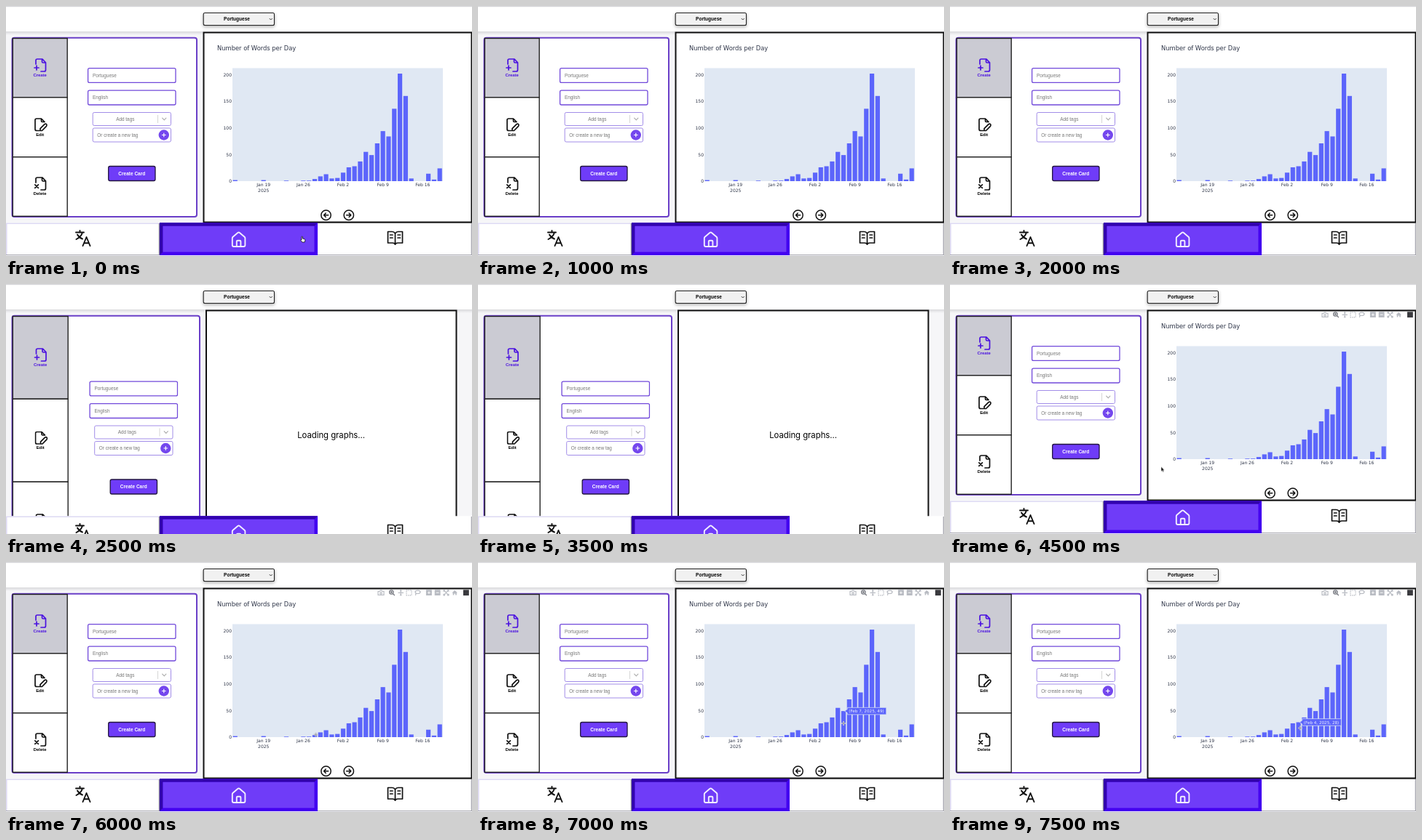
Animation, 640 px wide and 344 px high, one loop 8 s. Source, as an HTML page:

```html
<!DOCTYPE html>
<html lang="en">
<head>
<meta charset="utf-8">
<title>Flashcard dashboard</title>
<style>
html, body { margin: 0; width: 100%; height: 100%; overflow: hidden; background: #f6f6f8; }
svg { display: block; width: 640px; height: 344px; font-family: "Liberation Sans", Arial, sans-serif; }
.line { fill: none; stroke: #111; stroke-width: 1.7; stroke-linecap: round; stroke-linejoin: round; }
.box { fill: #fff; stroke: #111; stroke-width: 2; }
.card { fill: #fff; stroke: #6a3fc8; stroke-width: 2; }
.cell { fill: #fff; stroke: #222; stroke-width: 1.4; }
.on { fill: #cbcbd3; }
.field { fill: #fff; stroke: #7149da; stroke-width: 1.3; }
.soft { stroke: #a28de8; stroke-width: 1; }
.hint { font-size: 6.4px; fill: #777; }
.bold { font-weight: bold; font-size: 6.5px; }
.side { font-weight: bold; font-size: 5.9px; text-anchor: middle; }
.mid { text-anchor: middle; }
.plot { font-family: "DejaVu Sans", Verdana, sans-serif; font-size: 6px; fill: #2d3447; }
.tools { fill: none; stroke: #b9bcc3; stroke-width: 1.2; }

/* every part follows one 8 s clock and changes on half seconds */
.move, .home, .load, .tools, .hand, .arrow, .cross, .tip4, .tip7 {
  animation: 8s step-end infinite;
}
.move { animation-name: move; }
.home { animation-name: home; }
.load { animation-name: load; }
.tools { animation-name: tools; }
.hand { animation-name: hand; }
.arrow { animation-name: arrow; }
.cross { animation-name: cross; }
.tip4 { animation-name: tip4; }
.tip7 { animation-name: tip7; }
@keyframes move {
  0%, 56.25%, 100% { transform: none; }
  31.25% { transform: translate(var(--x), var(--y)); }
}
@keyframes home { 0%, 56.25%, 100% { visibility: visible; } 31.25% { visibility: hidden; } }
@keyframes load { 0%, 56.25%, 100% { visibility: hidden; } 31.25% { visibility: visible; } }
@keyframes tools { 0% { visibility: hidden; } 56.25%, 100% { visibility: visible; } }
@keyframes hand { 0% { visibility: visible; } 12.5%, 100% { visibility: hidden; } }
@keyframes arrow {
  0%, 62.5%, 100% { visibility: hidden; }
  50% { visibility: visible; transform: translate(270.5px, 248.5px); }
  56.25% { visibility: visible; transform: translate(290px, 251.5px); }
}
@keyframes cross {
  0% { visibility: hidden; }
  62.5% { visibility: visible; transform: translate(360px, 239px); }
  68.75% { visibility: visible; transform: translate(400px, 238px); }
  75% { visibility: visible; transform: translate(425.5px, 237.5px); }
  81.25% { visibility: visible; transform: translate(478px, 230px); }
  87.5% { visibility: visible; transform: translate(502px, 222px); }
  93.75%, 100% { visibility: visible; transform: translate(481px, 228.5px); }
}
@keyframes tip4 {
  0%, 87.5% { visibility: hidden; }
  81.25%, 93.75%, 100% { visibility: visible; }
}
@keyframes tip7 { 0%, 93.75%, 100% { visibility: hidden; } 87.5% { visibility: visible; } }
</style>
</head>
<body>
<svg viewBox="0 0 640 344">
  <defs>
    <linearGradient id="shade" x2="0" y2="1">
      <stop stop-color="#d9d9dc"/><stop offset="1" stop-color="#f6f6f8"/>
    </linearGradient>
    <filter id="drop" x="-20%" y="-30%" width="140%" height="200%">
      <feDropShadow dx="0" dy="2" stdDeviation="2" flood-opacity=".3"/>
    </filter>
    <path id="page" d="M41 80V75q0-2 2-2h7l4.5 4.800V88q0 2-2 2H48M49.500 73v3.500q0 1.500 1.500 1.500h3.500"/>
  </defs>

  <rect width="640" height="344" fill="#f6f6f8"/>
  <rect y="35" width="640" height="5" fill="url(#shade)"/>
  <rect width="640" height="35" fill="#fff"/>
  <rect width="640" height="1.200" fill="#d5d5d8"/>
  <rect x="271.200" y="9.500" width="97.300" height="17" rx="2" fill="#f1f1f1" stroke="#222" stroke-width="1.100" filter="url(#drop)"/>
  <text class="bold mid" x="317" y="20.300">Portuguese</text>
  <path class="line" style="stroke-width:.8" d="M362 17.300l1.700 1.700 1.700-1.700"/>

  <g class="home">
    <rect class="card" x="8.500" y="43.800" width="253.500" height="246.200" rx="3"/>
    <rect class="cell on" x="9.300" y="44.500" width="74.900" height="81.300"/>
    <rect class="cell" x="9.300" y="125.800" width="74.900" height="82"/>
    <rect class="cell" x="9.300" y="207.800" width="74.900" height="81.500"/>
    <rect class="box" x="271.500" y="36.500" width="368" height="261"/>
  </g>
  <g class="load">
    <rect class="card" x="8.500" y="43.800" width="257.500" height="340" rx="3"/>
    <rect class="cell on" x="9.300" y="44.500" width="75.900" height="113.700"/>
    <rect class="cell" x="9.300" y="158.200" width="75.900" height="114.100"/>
    <rect class="cell" x="9.300" y="272.300" width="75.900" height="114"/>
    <rect class="box" x="275" y="36.500" width="343.500" height="350"/>
    <text class="mid" x="446.600" y="211.500" style="font:11.3px Inter, sans-serif">Loading graphs...</text>
  </g>

  <g class="move" style="--x:.5px;--y:16px">
    <g class="line" style="stroke:#4b12e0"><use href="#page"/><path d="M39 85h6M42 82v6"/></g>
    <text class="side" x="46.700" y="97.300" fill="#4b12e0">Create</text>
  </g>
  <g class="move" style="--x:.5px;--y:48.500px">
    <path class="line" d="M45.500 171.500H42q-2 0-2-2V157q0-2 2-2h6.500l4.500 4.500M48.500 155v3q0 1.500 1.500 1.500h3M47 171.500v-2.800l6-6q1.400-1 2.500 0t0 2.600l-6 6.200z"/>
    <text class="side" x="46.700" y="178.700">Edit</text>
  </g>
  <g class="move" style="--x:.5px;--y:81px">
    <g class="line"><use href="#page" y="163"/><path d="M39.800 245.800l4.600 4.600m0-4.600l-4.600 4.600"/></g>
    <text class="side" x="46.700" y="260.300">Delete</text>
  </g>

  <g class="move" style="--x:2.500px;--y:48.500px">
    <rect class="field" x="112.600" y="85.600" width="120.400" height="19.800" rx="2"/>
    <text class="hint" x="119" y="97.800">Portuguese</text>
    <rect class="field" x="112.600" y="116.200" width="120.400" height="19.800" rx="2"/>
    <text class="hint" x="119" y="128.400">English</text>
    <rect class="field soft" x="119.200" y="146.500" width="107.300" height="18" rx="2"/>
    <text class="hint mid" x="163.800" y="157.800">Add tags</text>
    <path d="M208.500 150v11" stroke="#ccc" stroke-width=".8"/>
    <path class="line" style="stroke:#aaa;stroke-width:1.100" d="M214.700 154.200l2.600 2.600 2.600-2.600"/>
    <rect class="field soft" x="119.200" y="168" width="107.300" height="19" rx="2"/>
    <text class="hint" x="125.300" y="179.700">Or create a new tag</text>
    <circle cx="216.800" cy="177.500" r="7.200" fill="#7447ee"/>
    <path d="M214 177.500h5.600m-2.800-2.800v5.600" stroke="#fff" stroke-width="1.200"/>
    <rect x="140.700" y="220.500" width="64.300" height="20" rx="2.200" fill="#6f3cf8" stroke="#22153f" stroke-width="1.300"/>
    <text class="bold mid" x="172.800" y="232.700" fill="#fff">Create Card</text>
  </g>

  <g class="home">
    <g class="plot">
      <text x="290" y="61" style="font-size:8.350px">Number of Words per Day</text>
      <rect x="311" y="85.500" width="289" height="155.500" fill="#e0e8f3"/>
      <g id="bars" fill="#5c65fb"></g>
      <g id="ticks"></g>
    </g>
    <g class="line" style="stroke-width:1.500">
      <circle cx="439.500" cy="287.800" r="6.700"/>
      <path d="M442.700 287.800h-6.200m2.700-2.700l-2.700 2.700 2.700 2.700"/>
      <circle cx="470.800" cy="287.800" r="6.700"/>
      <path d="M467.600 287.800h6.200m-2.700-2.700l2.700 2.700-2.700 2.700"/>
    </g>
  </g>

  <g class="tools">
    <path d="M511 40.500h2l1-1.300h2l1 1.300h2v4.800h-8z"/><circle cx="515" cy="42.800" r="1.300"/>
    <g stroke="#74777f"><circle cx="529.300" cy="41.500" r="2.700"/><path d="M531.300 43.500l2.500 2.500M527.800 41.500h3m-1.500-1.500v3"/></g>
    <path d="M538.500 42.300h7.400M542.200 38.600V46M541 39.800l1.200-1.200 1.200 1.200M541 44.800l1.200 1.200 1.200-1.200"/>
    <path d="M550 38.800h7v7h-7z" stroke-dasharray="1.500 1"/>
    <ellipse cx="565.500" cy="41.300" rx="3.500" ry="2.200"/><path d="M563 43l-.5 3"/>
    <path d="M577.500 38.800h6.700v6.700h-6.700zM589.300 38.800h6.700v6.700h-6.700z" fill="#b9bcc3"/>
    <path d="M579 42.200h3.800m-1.900-1.900v3.800M590.800 42.200h3.800" stroke="#fff" stroke-width=".9"/>
    <path d="M601.500 39l6 6.500m0-6.500l-6 6.500M601 40.800v-2h2M606 38.800h2v2M601 43.800v2h2M606 45.800h2v-2"/>
    <path d="M612.500 42.500l3.800-3.700 3.800 3.700h-1.200v3h-1.700v-2h-1.800v2h-1.700v-3z" fill="#b9bcc3" stroke="none"/>
    <rect x="628" y="38.300" width="7.800" height="7.800" fill="#3a3a3e" stroke="none"/>
  </g>

  <g class="move" style="--x:0px;--y:21px">
    <rect y="298.300" width="640" height="44.700" fill="#fff"/>
    <path d="M0 299.300h211M.8 299v43" fill="none" stroke="#ddd9f3" stroke-width="1.500"/>
    <path d="M0 342.500h211M428 342.500h212M639.300 299v44" stroke="#a5a5ad" stroke-width="1.200"/>
    <path d="M271 298.200h369" class="home" stroke="#222" stroke-width="1"/>
    <path d="M210.500 299v44" stroke="#8e8b9d" stroke-width="1.500"/>
    <rect x="211" y="298.300" width="217" height="44.700" fill="#4300f0"/>
    <path d="M211 343v-44.700h217l-4.500 4.500h-208v35.700z" fill="#3203ad"/>
    <rect x="215.500" y="302.800" width="208" height="35.700" fill="#6f3cf8"/>
    <g class="line" style="stroke-width:1.900">
      <path d="M96 311.500h11M101.500 309v2.500M105 311.500q-1.500 6-8.500 9.500M98 314.500q2.500 4.500 7 6M105.500 330l5-12 5 12M107.300 326.300h6.500"/>
      <path d="M534.500 313v15M534.500 313q-1.500-2.500-4-2.500h-6v15.500h6.500q2.500 0 3.500 2 1-2 3.500-2h6.500v-15.500h-6q-2.500 0-4 2.500M527.500 315h3.500M527.500 319h3.500M538 315h3.500M538 319h3.500" stroke-width="1.700"/>
      <path d="M310.800 319.500q0-1 .8-1.700l6.700-5.800q1.300-1 2.600 0l6.700 5.800q.8.700.8 1.700v9.500q0 2-2 2h-13.600q-2 0-2-2zM316.800 331v-7q0-1.200 1.200-1.200h3.200q1.200 0 1.200 1.200v7" stroke="#f1edff"/>
    </g>
  </g>

  <g id="tips" class="plot"></g>
  <path class="hand" d="M406 317.300q1-.8 1.400.4v2.300l2.600.7q1 .4.800 1.500l-.6 2.800h-3.400l-2.300-3q.2-1.200 1.500-.2z" fill="#fff" stroke="#111" stroke-width=".8"/>
  <path class="arrow" d="M0 0v6.400l1.500-1.300 1 2.200 1.100-.5-1-2.100h2z" fill="#111" stroke="#fff" stroke-width=".4"/>
  <g class="cross">
    <path d="M-3 0h6M0-3v6" stroke="#eee" stroke-width="1.600"/>
    <path d="M-2.700 0h5.400M0-2.700v5.400" stroke="#6d7180" stroke-width=".7"/>
  </g>
</svg>
<script>
const counts = [2, 0, 0, 0, 0, 2, 0, 0, 0, 1, 0, 0, 1, 1, 4, 9, 13, 5, 6, 16, 26, 28,
  37, 55, 49, 71, 94, 84, 136, 202, 160, 5, 0, 0, 14, 3, 24];
const dayX = day => 314.7 + day * 7.805;
const countY = count => 241 - count * 0.7325;
const fill = (id, html) => { document.getElementById(id).innerHTML = html; };
const label = (x, y, anchor, text) => `<text x="${x}" y="${y}" text-anchor="${anchor}">${text}</text>`;

fill("bars", counts.map((n, day) =>
  `<rect x="${dayX(day) - 3.1}" y="${countY(n)}" width="6.2" height="${241 - countY(n)}"/>`).join(""));

const weeks = ["Jan 19", "Jan 26", "Feb 2", "Feb 9", "Feb 16"];
fill("ticks",
  [0, 50, 100, 150, 200].map(n => label(310, countY(n) + 2.2, "end", n)).join("") +
  weeks.map((name, i) => label(dayX(5 + 7 * i), 248, "middle", name)).join("") +
  label(dayX(5), 255.5, "middle", "2025"));

// Hover label for a day in February, pointing at the top of its bar
function tip(date) {
  const day = date + 17, n = counts[day];
  return `<g class="tip${date}" transform="translate(${dayX(day) + 1.5} ${countY(n)})">
    <path d="M0 0l3.700-2.500v-2.300h53.500v9.600h-53.500v-2.300z" fill="#5c65fb" stroke="#e0e8f3" stroke-width=".7"/>
    <text x="5.700" y="2.100" fill="#eef1ff" style="font-size:5.650px">(Feb ${date}, 2025, ${n})</text></g>`;
}
fill("tips", tip(4) + tip(7));
</script>
</body>
</html>
```
